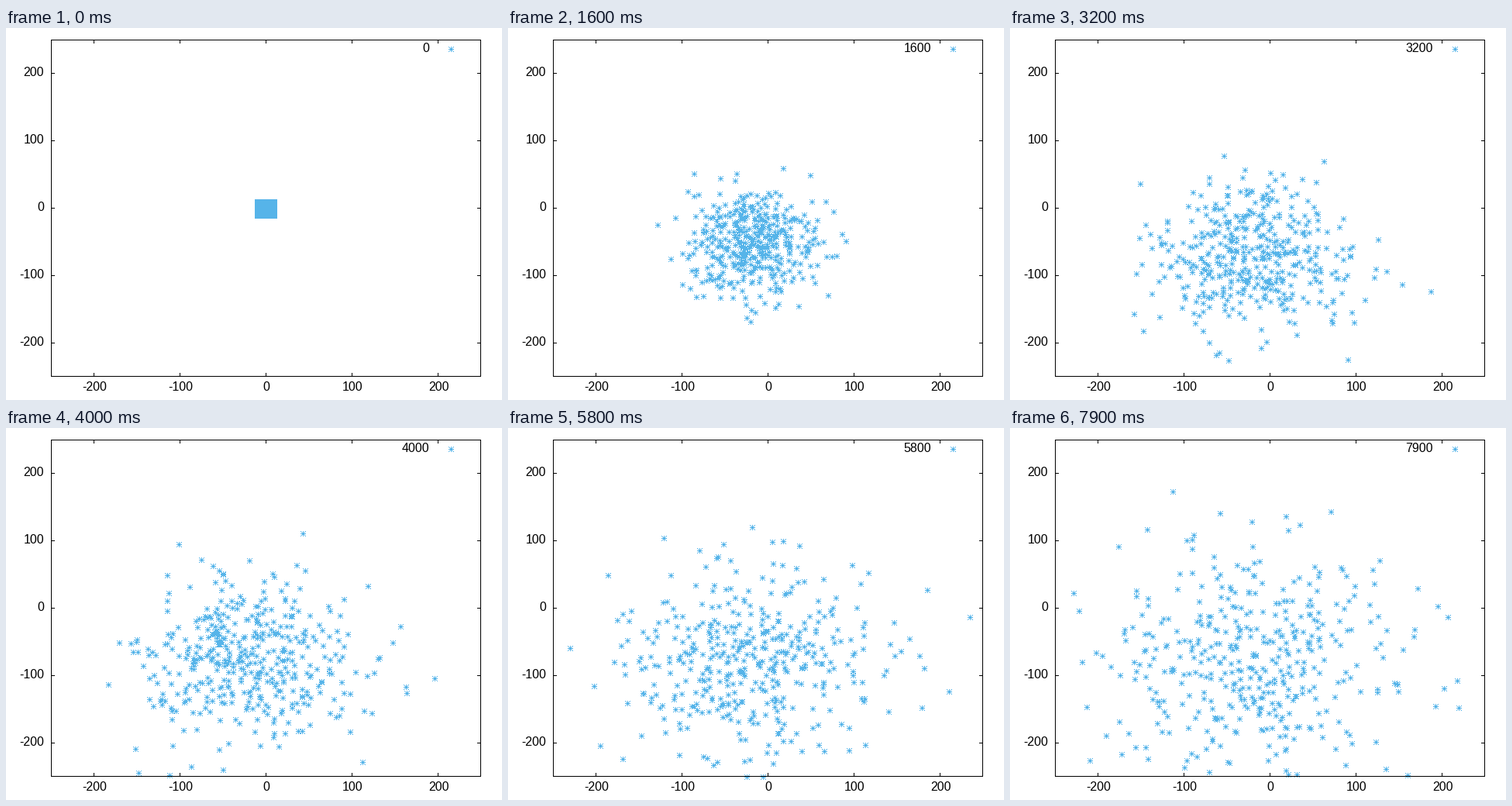
Write a matplotlib script that moves like this. It is 640 px wide and 480 px high and loops after 8 s.

```python
import numpy as np
import matplotlib.pyplot as plt
from matplotlib.animation import FuncAnimation

W, H = 640, 480
LEFT, RIGHT, TOP, BOTTOM = 58, 612, 15, 449
FRAMES, STEP = 80, 100
LIMIT = 250
BLUE = (86, 180, 233)

plt.rcParams.update({
    "font.family": "Liberation Sans",
    "font.size": 16 * 0.72,
})


def make_walks():
    """Random walks from a 21 x 21 block, with a drift that levels off."""
    rng = np.random.default_rng(12)
    side = np.arange(-10, 11)
    start = np.stack(np.meshgrid(side, side), -1).reshape(-1, 2)

    steps = rng.normal(0, 10, (FRAMES, len(start), 2))
    steps -= steps.mean(axis=1, keepdims=True)
    steps[0] = 0
    t = np.arange(FRAMES) * STEP
    drift = np.stack([-20 * (1 - np.exp(-t / 800)),
                      -82 * (1 - np.exp(-t / 1600))], -1)
    return np.rint(start + np.cumsum(steps, axis=0) + drift[:, None])


def px(x):
    return np.rint(335 + 1.108 * np.asarray(x)).astype(int)


def py(y):
    return np.rint(232 - 0.868 * np.asarray(y)).astype(int)


# Pixel offsets of a 7 px asterisk: both axes and both diagonals.
dy, dx = np.mgrid[-3:4, -3:4]
on = (dx == 0) | (dy == 0) | (abs(dx) == abs(dy))
DX, DY = dx[on], dy[on]


def stamp(canvas, x, y):
    canvas[np.add.outer(y, DY), np.add.outer(x, DX)] = BLUE


fig = plt.figure(figsize=(W / 100, H / 100), dpi=100, facecolor="white")
ax = fig.add_axes([0, 0, 1, 1])
ax.axis("off")

blank = np.full((H, W, 3), 255, np.uint8)
stamp(blank, 574, 27)
cloud = ax.imshow(blank, extent=(0, W, H, 0), aspect="auto",
                  interpolation="nearest")
ax.set(xlim=(0, W), ylim=(H, 0))


def segment(x0, y0, x1, y1):
    ax.plot([x0, x1], [y0, y1], color="black", lw=0.72, antialiased=False,
            solid_capstyle="butt", snap=False)


def draw_frame():
    for y in (TOP, BOTTOM):
        segment(LEFT, y + 0.5, RIGHT + 1, y + 0.5)
    for x in (LEFT, RIGHT):
        segment(x + 0.5, TOP, x + 0.5, BOTTOM + 1)
    for v in range(-200, 201, 100):
        x, y = px(v), py(v)
        segment(x + 0.5, TOP, x + 0.5, TOP + 5)
        segment(x + 0.5, BOTTOM - 4, x + 0.5, BOTTOM + 1)
        segment(LEFT, y + 0.5, LEFT + 5, y + 0.5)
        segment(RIGHT - 4, y + 0.5, RIGHT + 1, y + 0.5)
        ax.text(x + 1, 468, str(v), ha="center", va="baseline")
        ax.text(49, y + 4, str(v), ha="right", va="baseline")


draw_frame()
label = ax.text(546, 31, "0", ha="right", va="baseline")
walks = make_walks()


def update(i):
    p = walks[i]
    p = p[(np.abs(p) <= LIMIT).all(axis=1)]
    canvas = blank.copy()
    stamp(canvas, px(p[:, 0]), py(p[:, 1]) + 1)
    cloud.set_data(canvas)
    label.set_text(str(i * STEP))
    return cloud, label


anim = FuncAnimation(fig, update, frames=FRAMES, interval=100,
                     repeat=True, repeat_delay=0, blit=False)
plt.show()
```
